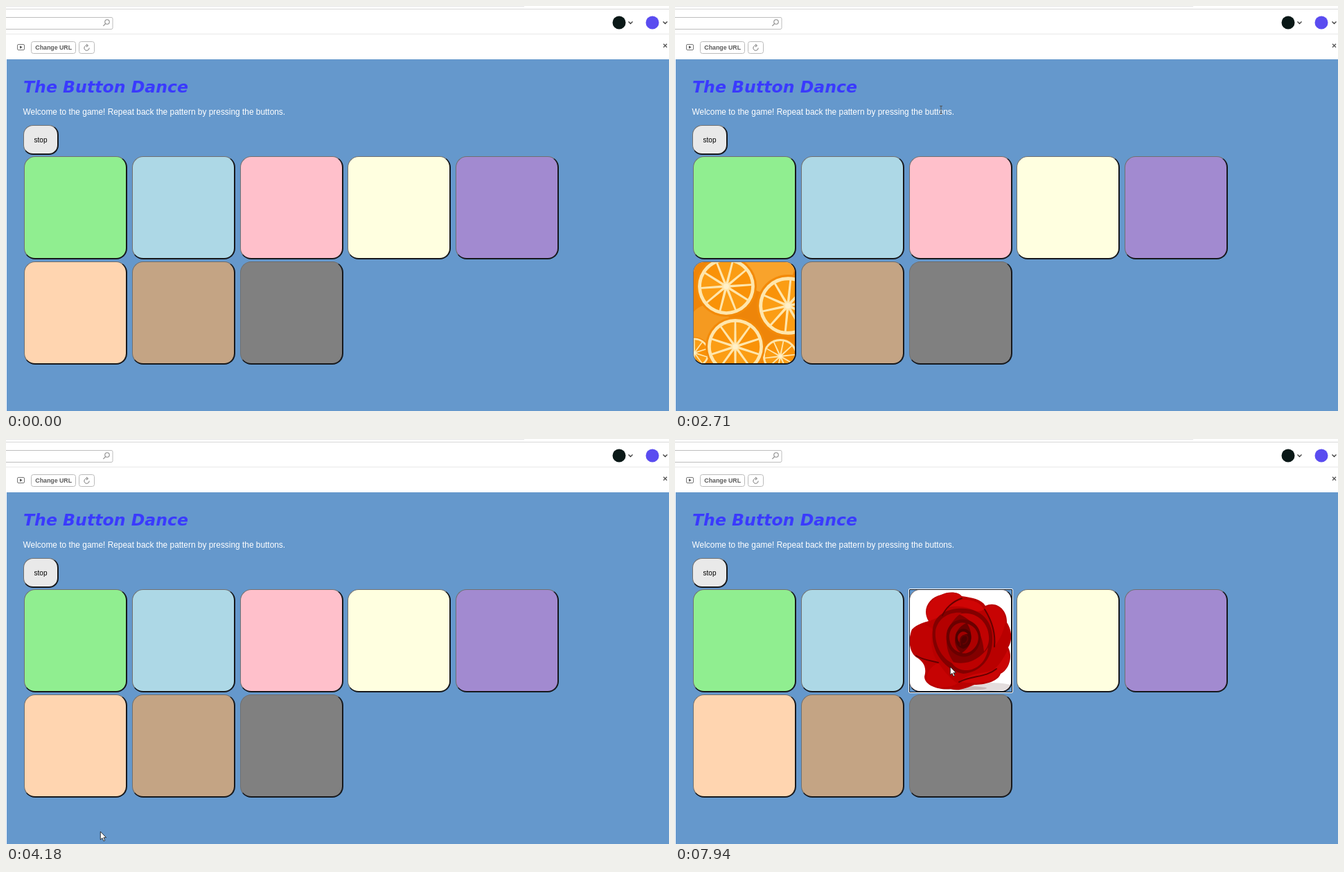
Write an HTML page that moves like this. It is 957 px wide and 585 px high and loops after 8000 ms.

```html
<!DOCTYPE html>
<html lang="en">
<head>
<meta charset="utf-8">
<title>The Button Dance</title>
<style>
html, body { margin: 0; width: 100%; height: 100%; overflow: hidden; background: #fff; }
#stage { position: relative; width: 957px; height: 585px; overflow: hidden; font-family: "Liberation Sans", Arial, sans-serif; }
#stage > * { position: absolute; box-sizing: border-box; }
#page { left: 1px; top: 77px; width: 956px; height: 508px; background: #6598cc; }
#chrome, #pointer { left: 0; top: 0; overflow: visible; }
.title { font: italic bold 23.6px "DejaVu Sans", Verdana, sans-serif; fill: #3a3aff; }
.intro { font-size: 11.9px; fill: #fff; }
.label { font-size: 8.8px; font-weight: bold; fill: #5a5a5a; }
.card, .stop { border: solid; border-width: 1px 2px 2px 1px; border-color: #707070 #16181c #16181c #707070; overflow: hidden; }
.card { width: 149px; height: 149px; border-radius: 16px; }
.card svg { position: absolute; left: 0; top: 0; width: 147px; height: 147px; }
.stop { left: 25px; top: 172px; width: 51px; height: 43px; border-radius: 14px; background: #e9e9e9; font-size: 10px; line-height: 41px; text-align: center; color: #000; }
.ring { width: 151px; height: 151px; border: 1px solid #fff; border-radius: 2px; box-shadow: inset 0 0 0 1px #10161f; }
</style>
</head>
<body>
<div id="stage">
  <div id="page"></div>
  <svg id="chrome" width="957" height="585" fill="none">
    <path d="M0 .5H748" stroke="#e6e6e6"/>
    <path d="M0 4.5H957" stroke="#d8d8d8"/>
    <path d="M0 40.5H957" stroke="#e9e9e9"/>
    <rect x="-5" y="16.5" width="159" height="17" rx="2" stroke="#bdbdbd"/>
    <g stroke="#8c8c8c" stroke-width="1.1">
      <circle cx="146" cy="23" r="3.2"/>
      <path d="M143.6 25.5L140.4 28.8"/>
    </g>
    <circle cx="885" cy="24" r="9.5" fill="#0a1817"/>
    <circle cx="933" cy="24" r="9.5" fill="#5a4cf0"/>
    <path d="M898.5 22.5l3 3 3-3M948.5 22.5l3 3 3-3" stroke="#444" stroke-width="1.4"/>
    <g stroke="#777">
      <rect x="16.5" y="55.5" width="10" height="8" rx="1.5"/>
      <path d="M20 57.3v4.4l3.6-2.2z" fill="#555" stroke="none"/>
    </g>
    <g stroke="#bababa">
      <rect x="36.5" y="51.5" width="64" height="17" rx="3"/>
      <rect x="105.5" y="51.5" width="22" height="17" rx="3"/>
    </g>
    <path d="M117.5 57.2a3.6 3.6 0 1 0 2.6 3.3M116 55l2.6 2.2-2.6 2" stroke="#777"/>
    <path d="M949 54.8l5 5M954 54.8l-5 5" stroke="#555" stroke-width="1.3"/>
    <text class="label" x="42.3" y="62.7">Change URL</text>
    <text class="title" x="25" y="125">The Button Dance</text>
    <text class="intro" x="24.6" y="156.5">Welcome to the game! Repeat back the pattern by pressing the buttons.</text>
  </svg>
  <div class="stop">stop</div>
</div>
<script>
const LOOP = 8000;
const stage = document.getElementById('stage');
const start = document.timeline.currentTime || 0;
const colors = ['#90ee90', '#add8e6', '#ffc0cb', '#ffffe0', '#a28ad0', '#ffd5b0', '#c4a484', '#808080'];

function play(el, frames) {
  const anim = el.animate(frames, { duration: LOOP, iterations: Infinity });
  anim.startTime = start;
}

// Visible only during the [from, to] spans
function show(el, spans) {
  const frames = [{ offset: 0, opacity: 0, easing: 'step-end' }];
  for (const [from, to] of spans) {
    frames.push({ offset: from / LOOP, opacity: 1, easing: 'step-end' });
    frames.push({ offset: to / LOOP, opacity: 0, easing: 'step-end' });
  }
  frames.push({ offset: 1, opacity: 0 });
  play(el, frames);
}

function add(tag, cls, x, y) {
  const el = document.createElement(tag);
  el.className = cls;
  el.style.left = x + 'px';
  el.style.top = y + 'px';
  stage.append(el);
  return el;
}

const path = (d, fill) => `<path d="${d}" fill="${fill}"/>`;
const picture = body => `<svg viewBox="1 1 147 147">${body}</svg>`;

function rose() {
  const petals = [
    ['M28 46C18 30 28 12 46 8C58 2 72 4 76 10C90 12 104 14 110 24C126 16 142 30 141 48C150 62 148 76 143 84C150 98 144 116 132 122C128 134 108 138 94 138C84 142 72 148 60 144C40 146 22 138 22 126C26 112 20 104 10 98C-1 90 -1 70 4 58C12 50 22 48 28 46Z', '#b90000'],
    ['M29 46C20 30 30 14 46 9C60 3 74 6 76 12C66 16 54 24 48 38Z', '#cd0505'],
    ['M56 26C66 10 100 12 108 29C102 34 96 32 88 28C76 24 66 24 56 26Z', '#d00505'],
    ['M108 28C124 16 142 32 138 52C133 70 128 76 124 82C124 60 118 44 108 28Z', '#c80303'],
    ['M4 60C14 48 26 50 34 58C30 76 32 92 42 106C28 104 14 102 8 94C-1 84 0 70 4 60Z', '#c00202'],
    ['M42 106C30 112 24 122 26 132C40 146 60 142 70 136C60 130 50 118 42 106Z', '#c60303'],
    ['M72 134C86 120 112 122 122 116C132 108 138 96 142 88C148 104 142 116 131 121C122 138 92 136 72 134Z', '#cb0505'],
    ['M34 58C36 34 62 24 88 29C110 34 122 52 120 76C119 102 102 120 78 122C54 118 30 92 34 58Z', '#830000'],
    ['M38 60C42 40 60 32 76 34C64 42 54 56 54 74C54 90 60 100 66 108C50 104 36 82 38 60Z', '#b40000'],
    ['M72 36C94 30 114 46 115 68C116 78 112 86 108 90C106 66 98 48 72 36Z', '#c00202'],
    ['M60 104C80 112 102 102 114 84C112 104 98 118 80 117C70 116 64 111 60 104Z', '#bd0101'],
    ['M54 64C56 48 72 40 86 45C100 50 106 64 102 78C96 96 80 102 67 94C57 88 52 76 54 64Z', '#6a0000'],
    ['M58 66C60 52 72 46 82 49C72 54 66 62 66 74C66 82 70 88 74 91C64 90 57 78 58 66Z', '#a30000'],
    ['M84 50C98 54 103 68 98 79C92 91 82 94 76 92C90 84 94 66 84 50Z', '#ad0000'],
    ['M67 68C68 56 82 54 88 62C92 72 88 84 78 86C70 84 66 78 67 68Z', '#4f0000'],
    ['M70 69C72 60 81 59 85 65C79 64 74 69 74 78C71 76 70 73 70 69Z', '#a00000']
  ];
  return '<rect width="150" height="150" fill="#fff"/>' +
    '<ellipse cx="116" cy="141" rx="34" ry="6" fill="#e3dddd"/>' +
    '<ellipse cx="78" cy="143" rx="34" ry="3" fill="#cbb9b9"/>' +
    petals.map(p => path(...p)).join('') +
    '<g fill="none" stroke="#650000" stroke-width="2" stroke-linecap="round">' +
    '<path d="M48 38C52 28 62 18 76 13M109 29C119 45 125 64 123 83M10 96C22 103 32 103 42 106M72 134C92 124 110 128 126 115M74 81C72 70 77 65 83 67C87 72 82 79 78 79"/></g>';
}

function slice(x, y, r, turn) {
  const disc = (k, fill) => `<circle cx="${x}" cy="${y}" r="${r * k}" fill="${fill}"/>`;
  let out = disc(1, '#f38a08') + disc(.93, '#ffe6ac');
  const count = 10;
  const at = (a, k) => `${(x + r * k * Math.cos(a)).toFixed(1)} ${(y + r * k * Math.sin(a)).toFixed(1)}`;
  for (let i = 0; i < count; i++) {
    const a = turn + i * 2 * Math.PI / count, w = Math.PI / count;
    out += path(`M${at(a, .13)}L${at(a - w * .88, .82)}A${r * .82} ${r * .82} 0 0 1 ${at(a + w * .88, .82)}Z`, i % 3 ? '#fb9d14' : '#f99208');
  }
  return out + disc(.09, '#fff0c8');
}

function oranges() {
  const list = [[2, 132, 23, 0], [126, 137, 27, .2], [137, 64, 45, .1], [48, 36, 44, .25], [61, 123, 43, 0]];
  return '<rect width="150" height="150" fill="#ee8509"/>' +
    '<circle cx="108" cy="8" r="38" fill="#f9a32b"/><circle cx="24" cy="92" r="30" fill="#f59a20"/>' +
    list.map(a => slice(...a)).join('');
}

const brown = '<defs><radialGradient id="cocoa"><stop stop-color="#7b4a2b"/><stop offset="1" stop-color="#4a2817"/></radialGradient></defs>' +
  '<rect width="150" height="150" fill="url(#cocoa)"/>';

const lit = {
  2: [rose(), [[0, 150], [520, 640], [1560, 2400], [3380, 3480], [4860, 5580], [7940, 7999]]],
  5: [oranges(), [[2710, 3550], [3690, 3820], [5920, 6630]]],
  6: [brown, [[6970, 7680]]]
};
const pressed = {
  2: [[520, 640], [3380, 3480], [7940, 7999]],
  5: [[3690, 3820]]
};

colors.forEach((color, i) => {
  const x = Math.round(26.3 + 155.6 * (i % 5)), y = i < 5 ? 217 : 369;
  const card = add('div', 'card', x, y);
  card.style.background = color;
  if (lit[i]) {
    card.innerHTML = picture(lit[i][0]);
    show(card.firstChild, lit[i][1]);
  }
  if (pressed[i]) show(add('div', 'ring', x - 1, y - 1), pressed[i]);
});

stage.insertAdjacentHTML('beforeend', `<svg id="pointer" width="10" height="15">
  <path id="arrow" d="M.3 0V11.8L3 9.3L4.9 13.7L6.8 12.9L4.9 8.7H8.6Z" fill="#fff" stroke="#111" stroke-width=".8"/>
  <path id="beam" d="M-2 -5.5H2M0 -5.5V5.5M-2 5.5H2" fill="none" stroke="#555"/>
</svg>`);

// Pointer stops: time, x, y
const track = [
  [0, 388, 235], [640, 388, 235], [810, 384, 150], [2970, 384, 150],
  [3200, 412, 284], [3440, 412, 284], [3640, 108, 462], [3830, 108, 462],
  [4180, 136, 567], [7280, 136, 567], [7460, 230, 540], [7730, 397, 329], [LOOP, 397, 329]
];
play(document.getElementById('pointer'), track.map(([t, x, y]) => ({
  offset: t / LOOP, transform: `translate(${x}px, ${y}px)`
})));
show(document.getElementById('arrow'), [[0, 775], [3010, 7999]]);
show(document.getElementById('beam'), [[775, 3010]]);
</script>
</body>
</html>
```
